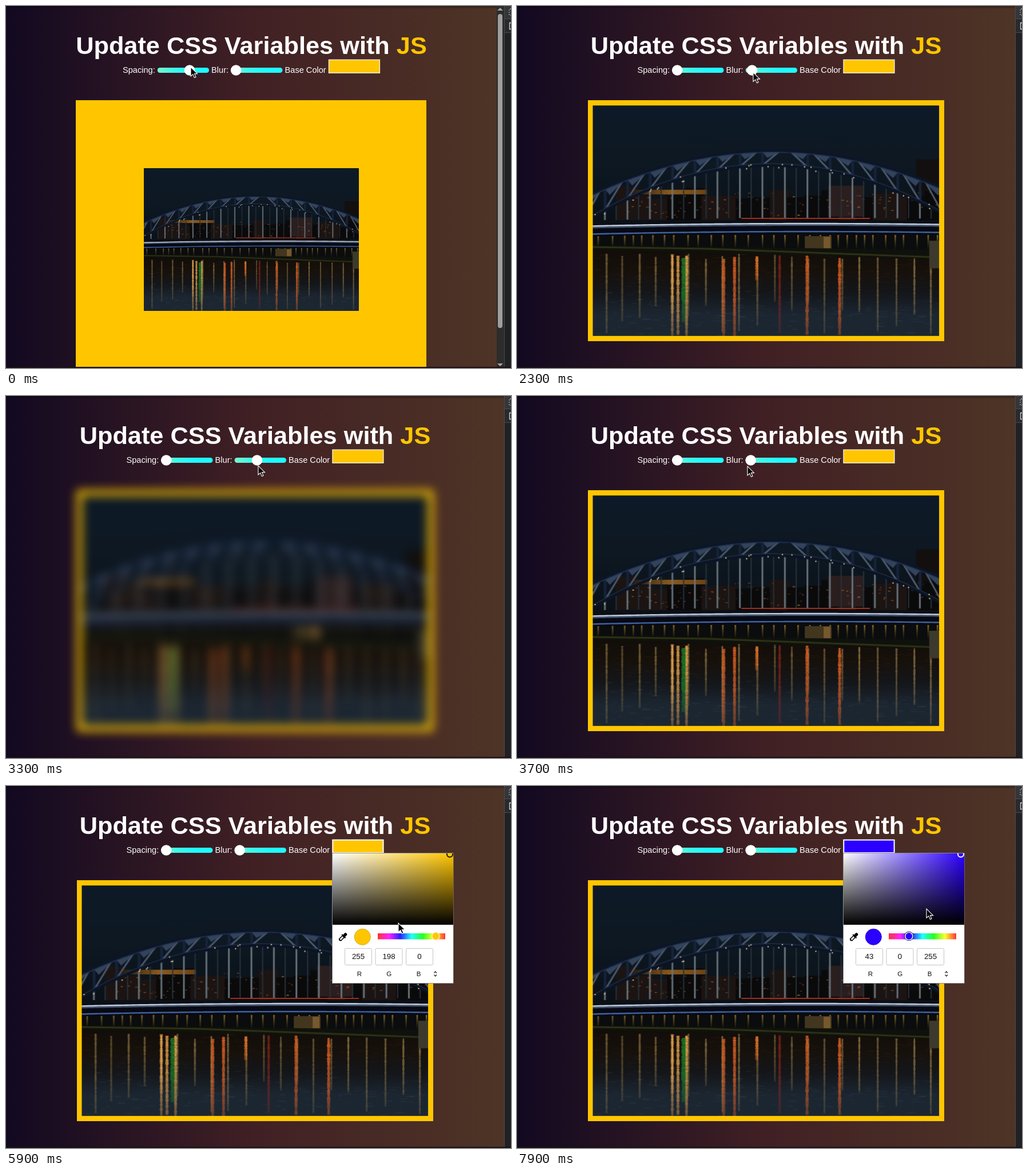
An HTML page with a canvas for the animation above (8000 ms loop, 883 by 634 pixels).

```html
<!DOCTYPE html>
<html lang="en">
<head>
<meta charset="utf-8">
<title>Update CSS Variables with JS</title>
<style>
  html, body { margin: 0; width: 100%; height: 100%; overflow: hidden; background: #14090f; }
  canvas { display: block; }
</style>
</head>
<body>
<canvas id="stage" width="883" height="634"></canvas>
<script>
const ctx = document.getElementById('stage').getContext('2d');
const SANS = '"Liberation Sans", Arial, sans-serif';
const AMBER = '#ffc600', BLUE = '#2b00ff';
const LOOP = 8000, STEP = 100;
const PHOTO_W = 606, PHOTO_H = 402;
const SLIDER_W = 90.3, THUMB_R = 9;
const BLUR_PER_PIXEL = 0.28;

const SHRUNK = 1200, BLUR_GRAB = 2300, BLUR_DROP = 3500, PICKER_OPEN = 5300, HUE_CLICK = 7400;

// Cursor stops: first step, last step, x, y
const STOPS = [
  [0, 0, 323, 107], [100, 100, 260, 105], [1200, 1200, 380, 126],
  [1400, 2100, 406, 115], [2300, 2600, 434, 120], [3000, 3000, 450, 123],
  [3200, 3300, 441, 122], [3500, 3500, 403, 123], [4100, 4100, 471, 129],
  [4300, 4900, 595, 111], [5300, 5900, 686, 240], [6200, 6200, 706, 273],
  [6500, 7000, 685, 261], [7700, 7700, 768, 236], [7800, 7900, 716, 215]
];

function cursorAt(time) {
  let x = 0, y = 0;
  for (const [first, last, toX, toY] of STOPS) {
    if (time < first) break;
    const progress = Math.min(1, (time - first + STEP) / (last - first + STEP));
    x += (toX - x) * progress;
    y += (toY - y) * progress;
  }
  return { x, y };
}

function gradient(c, x0, y0, x1, y1, ...colors) {
  const g = c.createLinearGradient(x0, y0, x1, y1);
  colors.forEach((color, i) => g.addColorStop(i / (colors.length - 1), color));
  return g;
}

function rect(c, fill, x, y, w, h) {
  c.fillStyle = fill;
  c.fillRect(x, y, w, h);
}

function pill(fill, x, y, w, h, r) {
  ctx.beginPath();
  ctx.roundRect(x, y, w, h, r);
  ctx.fillStyle = fill;
  ctx.fill();
}

function disc(x, y, r, fill, stroke, width = 1) {
  ctx.beginPath();
  ctx.arc(x, y, r, 0, Math.PI * 2);
  ctx.fillStyle = fill;
  ctx.fill();
  if (stroke) {
    ctx.strokeStyle = stroke;
    ctx.lineWidth = width;
    ctx.stroke();
  }
}

function polygon(c, fill, ...points) {
  c.beginPath();
  points.forEach(([x, y]) => c.lineTo(x, y));
  c.closePath();
  c.fillStyle = fill;
  c.fill();
}

function line(c, color, width, ...points) {
  c.beginPath();
  points.forEach(([x, y]) => c.lineTo(x, y));
  c.strokeStyle = color;
  c.lineWidth = width;
  c.stroke();
}

function text(str, x, y, font, color, align = 'left') {
  ctx.font = `${font} ${SANS}`;
  ctx.textAlign = align;
  ctx.fillStyle = color;
  ctx.fillText(str, x, y);
}

function textWidth(str, font) {
  ctx.font = `${font} ${SANS}`;
  return ctx.measureText(str).width;
}

function randomizer(seed) {
  return () => (seed = (seed * 16807) % 2147483647) / 2147483647;
}

function newCanvas(w, h) {
  const canvas = document.createElement('canvas');
  canvas.width = w;
  canvas.height = h;
  return canvas;
}

// Night bridge picture
const upperArch = x => 78 + 0.00075 * (x - 316) ** 2;
const lowerArch = x => 104 + 0.00093 * (x - 311) ** 2;
const deckY = x => 206 + 0.00003 * (x - 380) ** 2;

function curve(c, fn, dy, color, width) {
  const points = [];
  for (let x = -6; x <= PHOTO_W + 6; x += 6) points.push([x, fn(x) + dy]);
  line(c, color, width, ...points);
}

function paintSkyline(c, random) {
  rect(c, gradient(c, 0, 0, 0, 210, '#0d1a27', '#0d1822', '#0b1016'), 0, 0, PHOTO_W, 210);
  rect(c, '#120f0e', 566, 94, 40, 60);
  for (let x = 40; x < PHOTO_W; x += 30) {
    const top = 140 + random() * 26;
    rect(c, random() < 0.5 ? '#0b0a0b' : '#1b1412', x, top, 34, 200 - top);
  }
  rect(c, '#2a1e1f', 412, 140, 62, 54);
  rect(c, gradient(c, 70, 0, 202, 0, '#2a1a0c', '#8a5a1c', '#6a4216'), 70, 147, 130, 8);
  for (let i = 0; i < 110; i++) {
    const glow = `rgba(${170 + random() * 80},${80 + random() * 70},35,${0.2 + random() * 0.5})`;
    rect(c, glow, 60 + random() * 540, 150 + random() * 44, 1 + random() * 4, 1.5);
  }
  rect(c, '#a5301c', 260, 196, 225, 2);
}

function paintArch(c, random) {
  const spacing = 39.4;
  for (let x = 21; x < PHOTO_W; x += spacing) {
    const bottom = deckY(x) - 10;
    const mid = x + spacing / 2;
    if (lowerArch(x) < bottom) rect(c, '#66717a', x - 1.5, lowerArch(x), 3, bottom - lowerArch(x));
    if (lowerArch(mid) < bottom) rect(c, '#27323b', mid - 1, lowerArch(mid), 2, bottom - lowerArch(mid));
  }
  for (let x = -18; x < PHOTO_W; x += spacing) {
    const side = x < 300 ? 1 : -1;
    const near = side > 0 ? x : x + spacing;
    const far = near + side * spacing * 0.8;
    line(c, '#16223a', 5, [near, upperArch(near)], [near, lowerArch(near)]);
    line(c, '#4b5a70', 3, [near, lowerArch(near)], [far, upperArch(far)]);
    polygon(c, '#33435c', [near, upperArch(near) + 3], [far, upperArch(far) + 3], [near + side * 8, upperArch(near) + 13]);
  }
  curve(c, upperArch, 1, '#0c1628', 6);
  curve(c, upperArch, 3.5, '#2c3d5a', 1.2);
  curve(c, lowerArch, 0, '#0b1424', 6);
  curve(c, lowerArch, -2.5, '#293a54', 1);
  for (let i = 0; i < 30; i++) {
    const x = random() * PHOTO_W;
    rect(c, '#f3dcae', x, lowerArch(x) - 4 + random() * 10, 2, 2);
  }
}

function streak(c, random, x, bottom, width, rgb, strength) {
  const top = 258 + random() * 10;
  for (let y = top; y < bottom; y += 2) {
    const fade = 1 - 0.6 * ((y - top) / (bottom - top)) ** 2;
    const w = width * (0.75 + random() * 0.5);
    rect(c, `rgba(${rgb},${strength * fade * (0.75 + random() * 0.25)})`, x - w / 2, y, w, 2);
  }
}

function paintWater(c, random) {
  rect(c, gradient(c, 0, 252, 0, PHOTO_H, '#120d09', '#17110c', '#14161a', '#1c2631', '#1c2732'), 0, 252, PHOTO_W, 150);
  for (let i = 0; i < 420; i++) {
    const depth = random();
    const tint = depth < 0.45 ? '95,55,20' : '85,105,125';
    rect(c, `rgba(${tint},${random() * 0.22})`, random() * PHOTO_W, 258 + depth * 144, 4 + random() * 12, 1.2);
  }
  for (let x = 24; x < PHOTO_W; x += 27 + random() * 6) {
    streak(c, random, x, 340 + random() * 60, 3, '175,145,85', 0.5 + random() * 0.3);
  }
  for (const x of [139, 149, 164]) streak(c, random, x, 400, 4.5, '255,180,85', 0.9);
  for (const x of [229, 248, 375, 432]) streak(c, random, x, 400, 5, '240,105,40', 0.9);
  streak(c, random, 287, 304, 5, '245,120,40', 0.9);
  streak(c, random, 327, 395, 4, '190,45,35', 0.6);
  streak(c, random, 159, 378, 7, '30,140,45', 0.9);
}

function paintDeck(c, random) {
  rect(c, '#0a0c0d', 0, 214, PHOTO_W, 38);
  for (let x = 8; x < PHOTO_W; x += 14 + random() * 12) {
    rect(c, gradient(c, 0, 226, 0, 252, 'rgba(200,150,60,.75)', 'rgba(60,60,20,.1)'), x, 226, 2.5, 26);
  }
  rect(c, '#43361f', 371, 228, 47, 28);
  rect(c, '#76582c', 404, 229, 12, 20);
  polygon(c, '#0f110c', [0, 244], [PHOTO_W, 252], [PHOTO_W, 268], [0, 252]);
  line(c, '#2e3114', 3, [0, 247], [200, 250], [PHOTO_W, 265]);
  curve(c, deckY, 8, '#070a14', 20);
  curve(c, deckY, 2.5, '#44546f', 3);
  curve(c, deckY, 0, '#c6cfdc', 2.4);
  curve(c, deckY, 14, '#4464a0', 2.4);
  rect(c, '#3d3a2d', 589, 236, 17, 48);
}

function makePhoto() {
  const canvas = newCanvas(PHOTO_W, PHOTO_H);
  const c = canvas.getContext('2d');
  const random = randomizer(4711);
  [paintSkyline, paintArch, paintWater, paintDeck].forEach(paint => paint(c, random));
  return canvas;
}

function makeFramed(photo, w, h, pad) {
  const canvas = newCanvas(w, h);
  const c = canvas.getContext('2d');
  c.imageSmoothingQuality = 'high';
  rect(c, AMBER, 0, 0, w, h);
  c.drawImage(photo, pad, pad, w - 2 * pad, h - 2 * pad);
  return canvas;
}

const photo = makePhoto();
const wideFrame = makeFramed(photo, 613, 487, 118.5);
const slimFrame = makeFramed(photo, 624, 422, 9.2);

// Browser window
function drawPage(width) {
  rect(ctx, gradient(ctx, 0, 0, width, 0, '#120921', '#412024', '#4e3426'), 0, 0, width, 634);
  rect(ctx, gradient(ctx, 0, 0, 0, 5, 'rgba(0,0,0,.4)', 'rgba(0,0,0,0)'), 0, 0, width, 5);
}

function drawScrollbar() {
  rect(ctx, '#2c2c2d', 858, 0, 13, 634);
  pill('#9f9f9f', 860, 14, 8, 550, 4);
  polygon(ctx, '#a5a5a5', [859, 8], [864, 3], [869, 8]);
  polygon(ctx, '#a5a5a5', [859, 626], [864, 631], [869, 626]);
}

function drawDevtools() {
  rect(ctx, '#202124', 871, 0, 12, 634);
  rect(ctx, '#35363a', 872, 0, 11, 22);
  rect(ctx, '#292a2d', 872, 23, 11, 23);
  for (const y of [22, 46]) rect(ctx, '#4a4c50', 872, y, 11, 1);
  rect(ctx, '#4a4a4d', 871, 0, 1, 634);
  ctx.setLineDash([2, 2]);
  line(ctx, '#a8abb0', 1.3, [883, 5], [880, 5], [880, 16], [883, 16]);
  ctx.setLineDash([]);
  line(ctx, '#d2d4d8', 1.3, [883, 29.5], [880.5, 29.5], [880.5, 40.5], [883, 40.5]);
}

function drawSlider(x, thumbX) {
  pill(gradient(ctx, x, 0, x + SLIDER_W, 0, '#7af5ce', '#3cf8e8', '#1ffaff', '#1ffaff'), x, 108, SLIDER_W, 9, 4.5);
  disc(thumbX, 112.5, THUMB_R + 0.3, '#fff');
}

function drawTitle(center) {
  const font = 'bold 43.3px', words = 'Update CSS Variables with ';
  const wordsWidth = textWidth(words, font);
  const left = center - (wordsWidth + textWidth('JS', font)) / 2;
  text(words, left, 84, font, '#fff');
  text('JS', left + wordsWidth, 84, font, AMBER);
}

// Inline flow of labels and inputs, centred like the page text
function layoutControls(center) {
  const font = '14.6px', gap = textWidth(' ', font);
  const labels = ['Spacing:', 'Blur:', 'Base Color'];
  const widths = labels.map(label => textWidth(label, font));
  const total = widths.reduce((sum, w) => sum + w + SLIDER_W, 5 * gap);
  let x = center - total / 2;
  return labels.map((label, i) => {
    const control = { label, font, labelX: x, inputX: x + widths[i] + gap };
    x = control.inputX + SLIDER_W + gap;
    return control;
  });
}

function drawSwatch(x, color, focused) {
  const edge = focused ? 2 : 1.5;
  rect(ctx, focused ? '#fff' : '#f3ead2', x, 93.5, SLIDER_W, 24.5);
  rect(ctx, color, x + edge, 93.5 + edge, SLIDER_W - 2 * edge, 24.5 - 2 * edge);
}

function drawDropper(x, y) {
  ctx.save();
  ctx.translate(x, y);
  ctx.rotate(Math.PI / 4);
  pill('#000', -2.6, -9, 5.2, 7, 2);
  ctx.fillRect(-4.5, -3, 9, 2);
  ctx.strokeStyle = '#000';
  ctx.lineWidth = 1.5;
  ctx.strokeRect(-2.2, -1, 4.4, 8);
  ctx.fillRect(-1, 7, 2, 2);
  ctx.restore();
}

function drawPicker(picked) {
  const color = picked ? BLUE : AMBER;
  const channels = picked ? [43, 0, 255] : [255, 198, 0];
  rect(ctx, '#8d8d8d', 570, 117, 212.5, 229);
  rect(ctx, '#fff', 571, 118, 211, 227);
  rect(ctx, gradient(ctx, 571, 0, 782, 0, '#fff', color), 571, 118, 211, 125);
  rect(ctx, gradient(ctx, 0, 118, 0, 243, 'rgba(0,0,0,0)', '#000'), 571, 118, 211, 125);
  ctx.save();
  ctx.beginPath();
  ctx.rect(571, 118, 211, 125);
  ctx.clip();
  disc(776, 119.5, 5, color, picked ? '#fff' : '#1c1600', 2);
  ctx.restore();

  drawDropper(589, 264.5);
  disc(623.3, 264.3, 14, color, picked ? '#2500d8' : '#d8a800');
  rect(ctx, gradient(ctx, 650, 0, 768, 0, '#f33', '#f2f', '#22f', '#2ff', '#2f2', '#ff3', '#f33'), 650, 258, 118, 10.5);
  const hueX = picked ? 685.3 : 751.5;
  if (picked) disc(hueX, 263, 8.3, '#1a1a50');
  disc(hueX, 263, 7.3, picked ? '#fff' : '#ffeeb4');
  disc(hueX, 263, 5.9, color);

  channels.forEach((value, i) => {
    const left = 592.5 + 53.5 * i;
    ctx.strokeStyle = '#c4c4c4';
    ctx.lineWidth = 1;
    ctx.beginPath();
    ctx.roundRect(left, 284.5, 47, 29, 2);
    ctx.stroke();
    text(value, left + 23.5, 303, '13.3px', '#111', 'center');
    text('RGB'[i], 618 + 51.8 * i, 333, '11.5px', '#111', 'center');
  });
  for (const dir of [-1, 1]) {
    line(ctx, '#222', 1.2, [748.5, 329 + dir * 1.5], [750.8, 329 + dir * 4], [753, 329 + dir * 1.5]);
  }
}

function drawCursor({ x, y }) {
  ctx.save();
  ctx.translate(x, y);
  polygon(ctx, '#000', [0, 0], [0, 16], [3.8, 12.6], [6.4, 18.6], [9, 17.5], [6.5, 11.6], [11.5, 11.6]);
  ctx.strokeStyle = '#fff';
  ctx.lineWidth = 1.1;
  ctx.stroke();
  ctx.restore();
}

function draw(time) {
  const cursor = cursorAt(time);
  const scrolled = time < SHRUNK;
  const pickerOpen = time >= PICKER_OPEN;
  const picked = time >= HUE_CLICK;
  const pageWidth = scrolled ? 858 : 871;
  const [spacing, blur, base] = layoutControls(pageWidth / 2);

  const thumbX = (slider, dragging) =>
    Math.max(slider.inputX + THUMB_R, dragging ? cursor.x - 2 : 0);
  const spacingX = thumbX(spacing, scrolled);
  const blurX = thumbX(blur, time >= BLUR_GRAB && time < BLUR_DROP);
  const blurRadius = (blurX - blur.inputX - THUMB_R) * BLUR_PER_PIXEL;

  drawPage(pageWidth);
  if (scrolled) {
    ctx.drawImage(wideFrame, 122, 165);
    drawScrollbar();
  } else {
    ctx.filter = blurRadius > 0.1 ? `blur(${blurRadius}px)` : 'none';
    ctx.drawImage(slimFrame, 123.5, 165.2, 623.5, 421.6);
    ctx.filter = 'none';
  }
  drawDevtools();
  rect(ctx, '#1a1013', 0, 632, 883, 2);

  drawTitle(pageWidth / 2);
  for (const { label, font, labelX } of [spacing, blur, base]) text(label, labelX, 117, font, '#fff');
  drawSlider(spacing.inputX, spacingX);
  drawSlider(blur.inputX, blurX);
  drawSwatch(base.inputX, picked ? BLUE : AMBER, pickerOpen);
  if (pickerOpen) drawPicker(picked);
  drawCursor(cursor);
}

let shown = -1;
const start = performance.now();

function tick() {
  const time = Math.floor(((performance.now() - start) % LOOP) / STEP) * STEP;
  if (time !== shown) draw(shown = time);
  requestAnimationFrame(tick);
}
tick();
</script>
</body>
</html>
```
